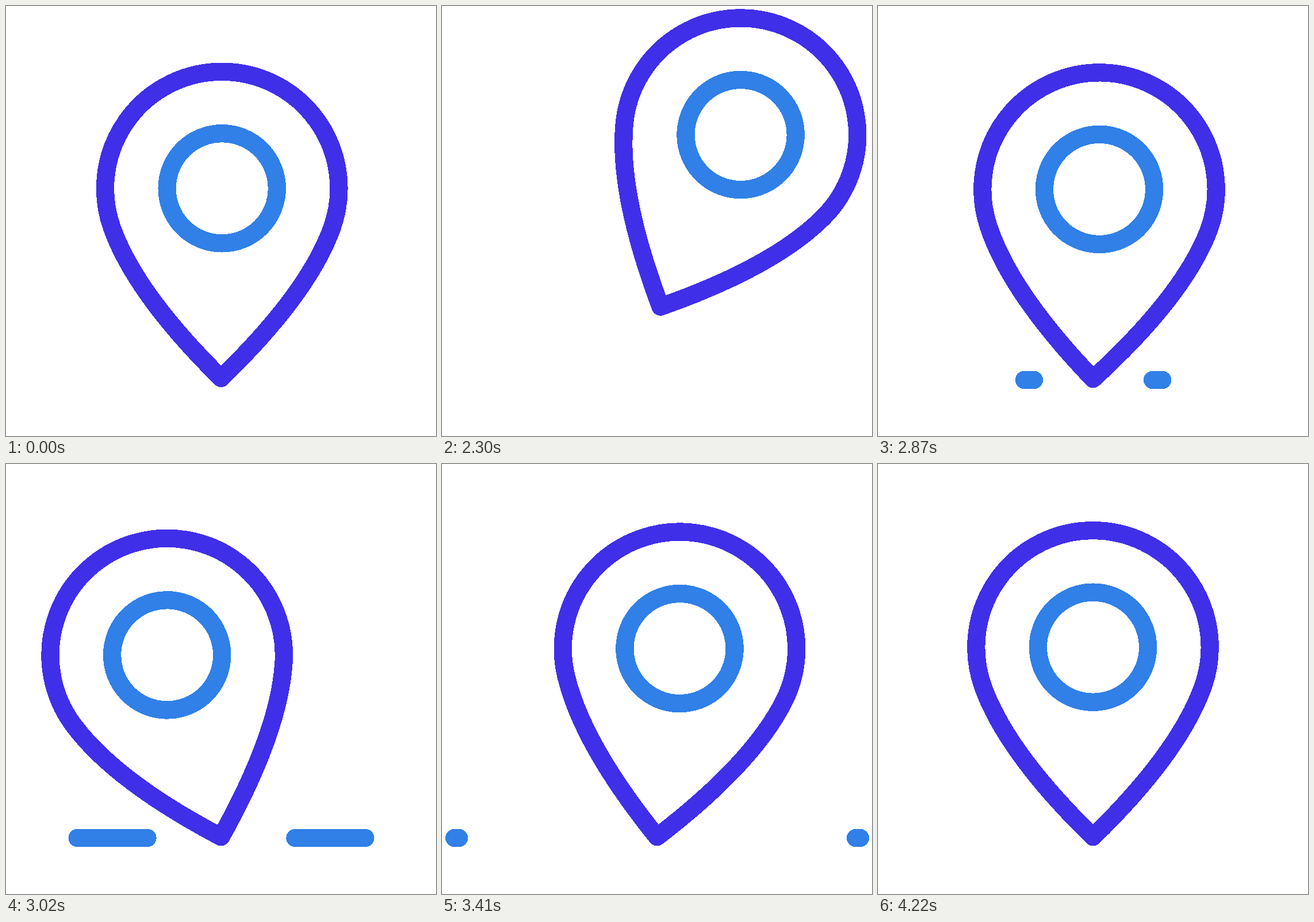
An HTML page that plays this animation: 748x748 px, repeating every 4.25 s.

```html
<!DOCTYPE html>
<html>
<head>
<meta charset="utf-8">
<style>
  html, body { margin: 0; height: 100%; overflow: hidden; background: #fff; }
  svg { display: block; width: 100%; height: 100%; shape-rendering: crispEdges; }
  path, circle { fill: none; stroke: #3080e8; stroke-width: 31.3; stroke-linecap: round; stroke-linejoin: round; }
  #outline { stroke: #402fe8; }
</style>
</head>
<body>
<svg viewBox="0 0 748 748">
  <path id="dashes"/>
  <!-- The pin's tip is the local origin, so it swings around its tip -->
  <g id="pin">
    <circle cy="-330" r="95.6"/>
    <path id="outline" d="M0 0Q-149.3 -145.8 -191 -260.5A203.2 203.2 0 1 1 191 -260.5Q149.3 -145.8 0 0Z"/>
  </g>
</svg>
<script>
const LOOP = 4250, HOLD = 2000, STEP = 30;
const TIP = { x: 374.1, y: 648.7 };
const SWING = [[0, 0], [16, 25], [45, 25], [71.5, -17.6], [101.5, 10.2], [125, -4], [150, 0]];
const pin = document.getElementById('pin');
const dashes = document.getElementById('dashes');

const progress = (t, from, to) => Math.min(1, Math.max(0, (t - from) / (to - from)));
const ease = (t, from, to) => {
  const p = progress(t, from, to);
  return p * p * (3 - 2 * p);
};

function swingAngle(t) {
  let angle = 0;
  for (let i = 1; i < SWING.length; i++) {
    const [from, a] = SWING[i - 1], [to, b] = SWING[i];
    angle += (b - a) * ease(t, from, to);
  }
  return angle;
}

// t counts sixtieths of a second of motion
function draw(t) {
  const airborne = 1 - progress(t, 45, 55) ** 1.9;
  const x = TIP.x + 13.4 * ease(t, 0, 45) * airborne;
  const y = TIP.y - 125.6 * ease(t, 0, 16) * airborne;
  pin.setAttribute('transform', `translate(${x} ${y}) rotate(${swingAngle(t)})`);

  const outer = 103 + 250 * ease(t, 55, 80);
  const inner = 103 + 250 * ease(t, 61.6, 99);
  const dash = side => `M${374.5 + side * inner} 650.5H${374.5 + side * outer}`;
  dashes.setAttribute('d', outer > inner ? dash(-1) + dash(1) : '');
}

function tick() {
  const time = performance.now() % LOOP;
  const step = Math.max(0, Math.floor((time - HOLD) / STEP));
  draw(2 * step + 1);
  requestAnimationFrame(tick);
}
tick();
</script>
</body>
</html>
```
